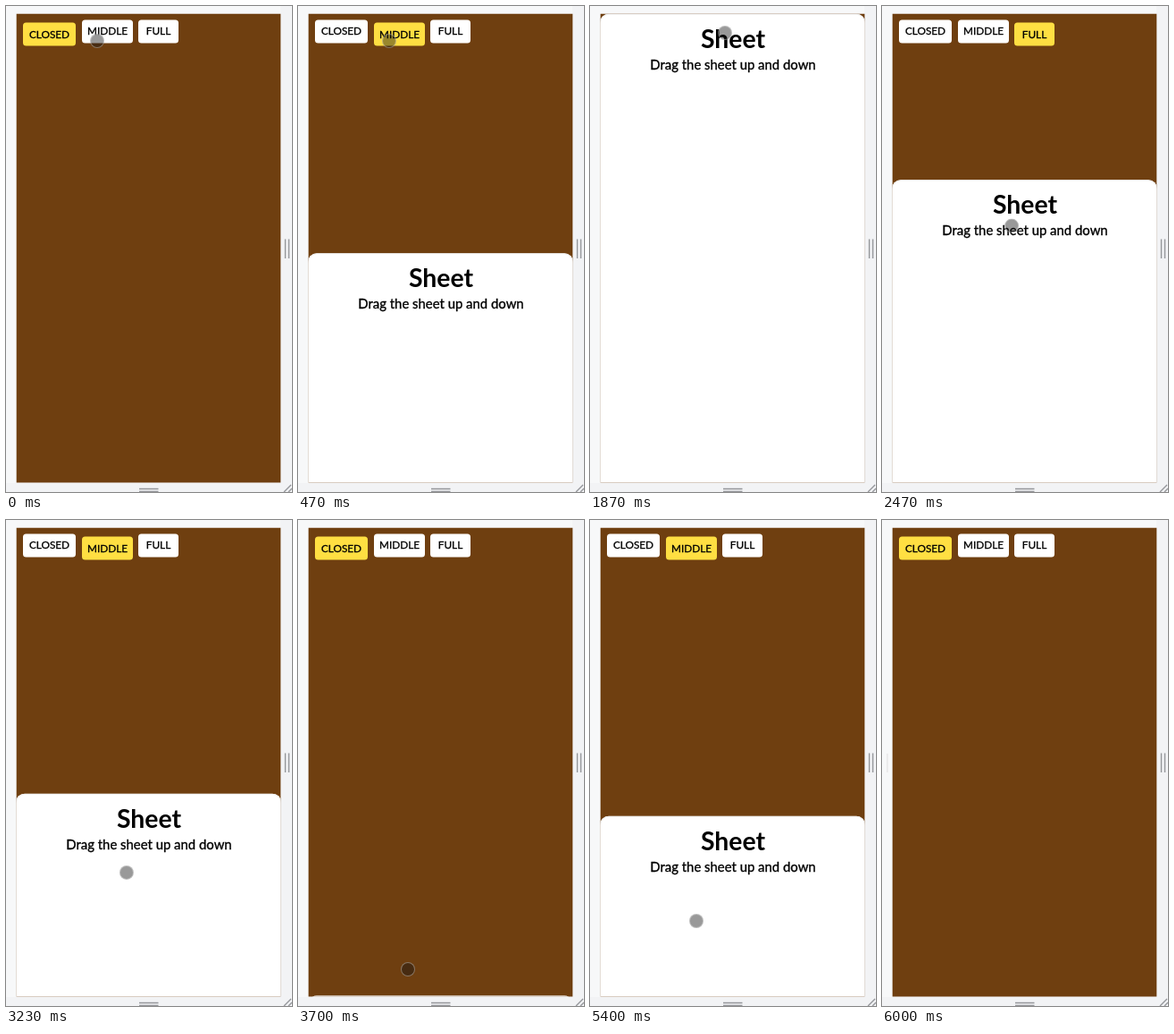
Animation of 320 by 543 pixels, one loop 6.06 s. Source, as an HTML page:

```html
<!DOCTYPE html>
<html lang="en">
<head>
<meta charset="utf-8">
<title>Bottom sheet</title>
<style>
  html, body { margin: 0; width: 100%; height: 100%; overflow: hidden; background: #f7f8f9; }
  body { position: relative; font-family: Lato, "Open Sans", sans-serif; color: #000; }
  div, i { position: absolute; box-sizing: border-box; }
  .rail-right { left: 307px; top: 0; width: 13px; height: 543px; background: #f2f3f5; }
  .rail-bottom { left: 0; top: 533px; width: 320px; height: 10px; background: #f2f3f5; }
  svg { position: absolute; left: 0; top: 0; }
  #ghost { left: 5px; top: 261px; width: 2px; height: 21px; background: #ebebec; }
  .panel {
    left: 0; top: 0; width: 320px; height: 543px; background: #6f3f10;
    clip-path: inset(8.7px 12.7px 10.6px 11.7px);
  }
  .btn {
    top: 15px; height: 26px; border-radius: 3.5px; overflow: hidden;
    font-size: 11.8px; line-height: 26px; text-align: center; white-space: nowrap;
    -webkit-text-stroke: .3px #000;
  }
  .btn i { inset: 0; background: rgba(51, 181, 229, .4); }
  #sheet {
    left: 11px; top: 0; width: 297px; height: 540px; background: #fff;
    border-radius: 10px 10px 0 0; box-shadow: inset 0 0 0 1px #eee;
    text-align: center; white-space: nowrap;
  }
  #sheet div { left: 0; width: 298px; }
  .title { top: 11px; font-size: 28.4px; line-height: 33px; font-weight: 700; }
  .hint { top: 47px; font-size: 14.9px; line-height: 18px; -webkit-text-stroke: .35px #000; }
  #touch {
    left: -8px; top: -8px; width: 16px; height: 16px; border-radius: 50%;
    background: rgba(20, 20, 20, .43); border: 1px solid rgba(255, 255, 255, .35);
  }
</style>
</head>
<body>
<div class="rail-right"></div>
<div class="rail-bottom"></div>
<div id="ghost"></div>
<svg width="320" height="543" fill="none" stroke="#94969a" stroke-width="1.4">
  <path d="M312.5 260.5v21.5M316.5 260.5v21.5M149 539.5h21.5M149 542.5h21.5M311 543l8-8M316 543l4-4"/>
</svg>
<div class="panel">
  <div class="btn" style="left:19px;width:59px">CLOSED<i></i></div>
  <div class="btn" style="left:85px;width:57px">MIDDLE<i></i></div>
  <div class="btn" style="left:148px;width:45px">FULL<i></i></div>
  <div id="sheet">
    <div class="title">Sheet</div>
    <div class="hint">Drag the sheet up and down</div>
  </div>
  <div id="touch"></div>
</div>
<script>
const LOOP = 6060, OMEGA = 0.0164, FADE = 125;
const SNAP = [533, 269.8, 8.7]; // sheet top when closed, middle, full

// Touch point: time, x, y
const path = [
  [0, 102, 39], [670, 102, 39], [950, 164, 34], [1380, 164, 34], [1850, 151, 30],
  [2130, 151, 30], [2640, 143, 321], [3130, 143, 321], [3360, 123, 502],
  [4030, 123, 502], [4330, 120, 39], [4690, 120, 39], [5180, 119, 350],
  [5300, 119, 350], [5560, 119, 647], [LOOP, 119, 647]
];

// Moves: t = snap start, to = snap index; drags also have a start time and a grab height
const moves = [
  { t: 130, to: 1 },
  { t: 1100, to: 2 },
  { t: 2500, to: 1, drag: 2130, grab: 60 },
  { t: 3310, to: 0, drag: 3130, grab: 358 },
  { t: 4400, to: 1 },
  { t: 5480, to: 0, drag: 5300, grab: 387 }
];

const clamp = v => Math.max(0, Math.min(1, v));
const smooth = u => u * u * (3 - 2 * u);
const mix = (a, b, u) => a + (b - a) * u;

function touchAt(t) {
  const k = Math.max(1, path.findIndex(p => p[0] > t));
  const a = path[k - 1], b = path[k];
  const u = smooth(clamp((t - a[0]) / (b[0] - a[0])));
  return [mix(a[1], b[1], u), mix(a[2], b[2], u)];
}

const dragged = (m, base, t) => base + Math.max(0, touchAt(t)[1] - m.grab);

// Critically damped spring
function spring(from, to, v, t) {
  const d = from - to;
  return to + (d + (v + OMEGA * d) * t) * Math.exp(-OMEGA * t);
}

function sheetAt(t) {
  let base = SNAP[0], y = base;
  for (const m of moves) {
    const end = SNAP[m.to];
    if (t >= m.t) {
      const from = m.drag ? dragged(m, base, m.t) : base;
      const v = m.drag ? Math.min(0.5, from - dragged(m, base, m.t - 1)) : 0;
      y = spring(from, end, v, t - m.t);
    } else if (m.drag && t >= m.drag) {
      y = dragged(m, base, t);
    }
    base = end;
  }
  return y;
}

function activeAmount(i, t) {
  let now = 0, before = 0, since = -LOOP;
  for (const m of moves) if (t >= m.t) { before = now; now = m.to; since = m.t; }
  const u = clamp((t - since) / FADE);
  return i === now ? u : i === before ? 1 - u : 0;
}

function highlight(i, t) {
  const tap = moves.find(m => !m.drag && m.to === i && t >= m.t - 70 && t < m.t + 190);
  return tap ? clamp((tap.t + 190 - t) / 100) : 0;
}

const $ = id => document.getElementById(id);
const sheet = $("sheet"), touch = $("touch"), ghost = $("ghost");
const buttons = [...document.querySelectorAll(".btn")];

function draw(now) {
  const t = now % LOOP, [x, y] = touchAt(t);
  touch.style.transform = `translate(${x}px,${y}px)`;
  sheet.style.transform = `translateY(${sheetAt(t)}px)`;
  ghost.style.opacity = t > 5890 ? 1 : 0;
  buttons.forEach((b, i) => {
    const u = activeAmount(i, t);
    b.style.transform = `translateY(${0.4 + 3.2 * u}px)`;
    b.style.background = `rgb(255,${mix(255, 223, u)},${mix(255, 66, u)})`;
    b.lastChild.style.opacity = highlight(i, t);
  });
}

let start;
function tick(now) {
  start ??= now;
  draw(now - start);
  requestAnimationFrame(tick);
}
draw(0);
requestAnimationFrame(tick);
</script>
</body>
</html>
```
